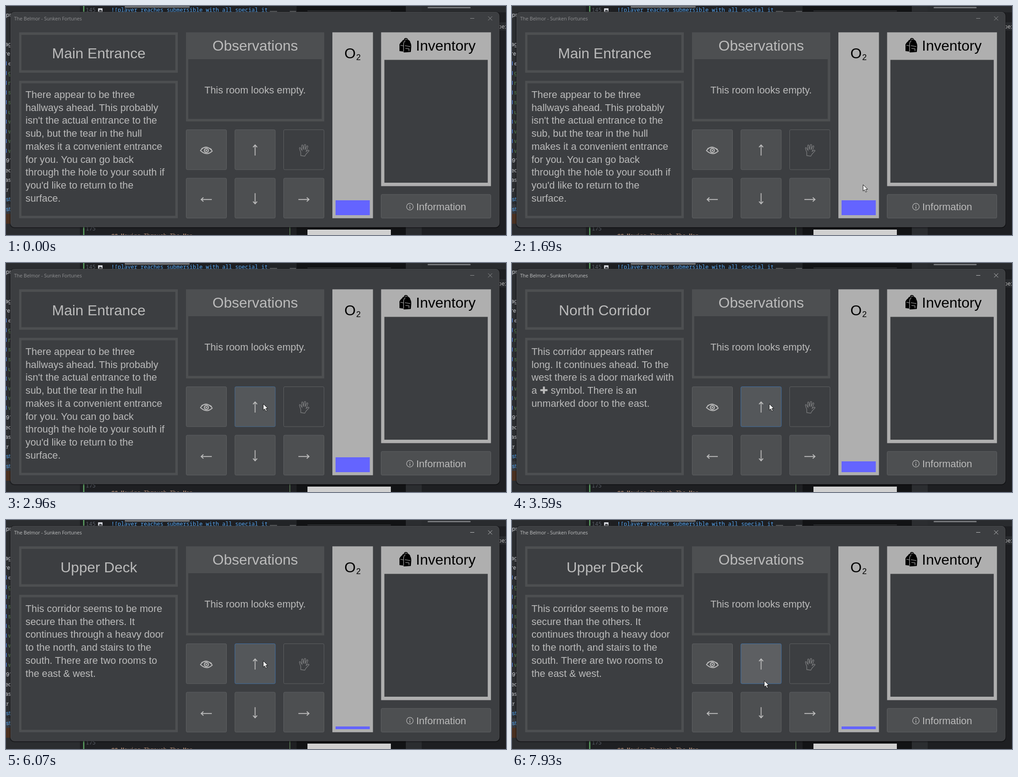
An HTML page that plays this animation: 1103x508 px, repeating every 8000 ms.

```html
<!DOCTYPE html>
<html lang="en">
<head>
<meta charset="utf-8">
<title>The Belmor</title>
<style>
  html, body { margin: 0; width: 100%; height: 100%; overflow: hidden; background: #1e1f22; }
  svg { display: block; width: 1103px; height: 508px; }
  text { font-family: "Liberation Sans", Arial, sans-serif; font-size: 21.8px; fill: #bbb; white-space: pre; }
  .head { font-size: 32px; }
  .mid { text-anchor: middle; }
  .black { fill: #000; }
  .code { font: 12px "Noto Sans Mono", "DejaVu Sans Mono", monospace; }
  .side { font: 12px Inter, "Open Sans", sans-serif; }
  .caption { font: 10.6px "Open Sans", "Noto Sans", sans-serif; }
  .sign { font-family: "DejaVu Sans", sans-serif; }
  .line { fill: none; stroke: #bbb; stroke-width: 1.9; }
  .frame { fill: #4d4f51; }
  .pale { fill: #afafaf; }
  .back { fill: #3c3e41; }
</style>
</head>
<body>
<svg viewBox="0 0 1103 508">
  <!-- editor behind the window -->
  <rect width="1103" height="508" fill="#1e1f22"/>
  <rect width="163" height="508" fill="#2b2d30"/>
  <rect y="440" width="163" height="21" fill="#35383d"/>
  <rect y="461" width="163" height="22" fill="#4a3020"/>
  <rect x="170" width="3" height="508" fill="#549159"/>
  <text class="code" x="176" y="13" style="fill:#5b6069">145</text>
  <rect x="203" y="5" width="10" height="8" rx="1" fill="#ced0d6"/>
  <path d="M204.500 12l3-4 2 2 1-1 2 3z" fill="#2b2d30"/>
  <text class="code" x="232" y="13" style="fill:#56a8f5">![player reaches submersible with all special items](</text>
  <rect x="262" y="0" width="143" height="4" fill="#6b6d70"/>
  <rect x="576" y="0" width="66" height="13" fill="#222427"/>
  <path d="M582 12h16M626 12h14" stroke="#a0a2a6"/>
  <rect x="641" width="241" height="508" fill="#121315"/>
  <rect x="665" y="10" width="184" height="2" fill="#2e3033"/>
  <rect x="882" width="35" height="508" fill="#2b2d30"/>
  <rect x="917" width="186" height="14" fill="#292b2e"/>
  <rect x="930" y="2" width="95" height="3" rx="1.500" fill="#77797c"/>
  <rect x="1088" y="36" width="15" height="18" fill="#292b2e"/>
  <text class="code" x="1086" y="50">per</text>
  <text class="code" x="176" y="498" style="fill:#5b6069">175</text>
  <text class="code" x="232" y="514" style="fill:#b08a72">## Moving Through The Map</text>
  <rect x="625.500" y="480" width="1.500" height="28" fill="#5d8158"/>
  <rect x="665" y="496" width="184" height="12" fill="#d0d0d0"/>
  <g id="tree"></g>

  <!-- window -->
  <rect x="8" y="12" width="1082" height="481" rx="10" fill="#000" opacity=".3"/>
  <rect class="back" x="10.500" y="13.500" width="1077.500" height="476.500" rx="8" stroke="#48494c"/>
  <g id="bar">
    <text class="caption" x="18" y="31.500" style="fill:currentColor">The Belmor - Sunken Fortunes</text>
    <path d="M1024 27.500h9M1063.500 23l9 9m0-9l-9 9" fill="none" stroke="currentColor"/>
  </g>

  <rect class="frame" x="29" y="58.400" width="350" height="89.600"/>
  <rect class="back" x="34" y="64" width="339.500" height="78.500"/>
  <text class="head mid" id="room" x="204.700" y="116"></text>
  <rect class="frame" x="29" y="166" width="350" height="304.800"/>
  <rect class="back" x="34" y="171.500" width="339.500" height="294"/>
  <g id="story"></g>

  <rect class="frame" x="397" y="58.400" width="305" height="197.600"/>
  <rect class="back" x="402" y="118" width="294.500" height="132.500"/>
  <text class="head mid" x="549.800" y="99">Observations</text>
  <text class="mid" id="seen" x="549.500" y="193.500"></text>

  <rect class="pale" x="720" y="58.400" width="89.500" height="412.400"/>
  <text class="head black" x="746.500" y="116">O</text>
  <text class="black" x="772.500" y="119.500" style="font-size:18px">2</text>
  <rect id="air" x="727" width="75.500" fill="#6464ff"/>

  <rect class="pale" x="827.500" y="58.400" width="242.300" height="341.200"/>
  <rect class="back" x="834.700" y="119.500" width="228" height="272.500"/>
  <text class="head black" x="904.300" y="99">Inventory</text>
  <g>
    <path d="M874 78q1-3 4-3 0-4 4-4t5 4q4 1 5 6 2 3 2 9l-1 12-15 1-2-2-8-1V85q2-4 6-7z"/>
    <path d="M877 101V86q0-7 4-9M870 87l7 1.500M880 88l12 2M881 94l8 1v5M880 75q2-3 5 0" fill="none" stroke="#afafaf" stroke-width="1.200"/>
  </g>

  <g id="buttons"></g>
  <path id="cursor" d="M.500.500v14l3.300-3 2.400 5.300 2.400-1-2.400-5.200h4.500z" fill="#fff" stroke="#111"/>
</svg>
<script>
const LOOP = 8000;
const $ = id => document.getElementById(id);

const rooms = [
  { at: 0, name: 'Main Entrance', air: 33, seen: 'This room looks empty.', off: 'hand',
    story: "There appear to be three|hallways ahead. This probably|isn't the actual entrance to the|sub, but the tear in the hull|makes it a convenient entrance|for you. You can go back|through the hole to your south if|you'd like to return to the|surface." },
  { at: 3590, name: 'North Corridor', air: 24, seen: 'This room looks empty.', off: 'hand',
    story: 'This corridor appears rather|long. It continues ahead. To the|west there is a door marked with|a ✚ symbol. There is an|unmarked door to the east.' },
  { at: 4850, name: 'Far N. Corridor', air: 15, seen: 'You can see a extinguisher.', off: 'eye',
    story: 'The corridor continues up some|stairs to the north. West there is|a door with: ⚠ WARNING ⚠|GLOVES &amp; FACE COVERS|MUST BE WORN. To the east is|an unmarked door.' },
  { at: 6070, name: 'Upper Deck', air: 6, seen: 'This room looks empty.', off: 'hand',
    story: 'This corridor seems to be more|secure than the others. It|continues through a heavy door|to the north, and stairs to the|south. There are two rooms to|the east &amp; west.' }
];

const presses = [[3490, 3590], [4580, 4850], [5900, 6070], [7800, LOOP]];
const FOCUS_AT = 3490;

// start, end, step count, waypoints
const moves = [
  [520, 1280, 12, [[948, 470], [905, 425], [830, 407], [711, 445], [722, 425]]],
  [1340, 1690, 6, [[740, 405], [774, 396]]],
  [1750, 2090, 6, [[811, 415], [742, 460], [735, 410], [797, 370]]],
  [2150, 2150, 1, [[788, 366]]],
  [2480, 2960, 8, [[680, 335], [567, 312]]],
  [6730, 7070, 6, [[552, 412]]],
  [7400, 7660, 5, [[556, 356]]]
];

const arrow = (turn, y = 0) =>
  `<path class="line" transform="translate(0 ${y}) rotate(${turn})" d="M0 12V-11M-4.500-6.500L0-11.500 4.500-6.500"/>`;
const icons = {
  eye: '<path class="line" d="M-13 1Q-1-15 13 2 1 14-13 1zM-11-3Q0-10.500 12-1"/><circle cy=".700" r="5.500" fill="#bbb"/><circle cy=".700" r="3.300" fill="#4d4f51"/><circle cy=".700" r="1.800" fill="#bbb"/>',
  up: arrow(0), down: arrow(180), left: arrow(-90, 2), right: arrow(90, 2),
  hand: '<path class="line" transform="rotate(8)" style="stroke-width:1.200" d="M-5 13L-6 6-10-2q-1-2.500 1-2.500 1 0 2 2L-4 1-6-9q0-2 1.500-2 1 0 1.500 2L-1-1-.500-11q0-2 1.500-2t1.500 2V-1L5-9q1-2 2-1.500 1.200.500.600 2.500L5.500 2 9-1q2-1 2.500.500 0 1-1 2L6 8 4 13z"/>',
  info: '<circle class="line" cx="-57.500" r="7.300" style="stroke-width:1.300"/><path class="line" style="stroke-width:1.500" d="M-57.500-4v2m0 1.500v5"/><text x="-43.500" y="7.500" style="font-size:22px">Information</text>'
};

const buttons = [
  ['eye', 397, 274], ['up', 504.5, 274], ['hand', 612, 274],
  ['left', 397, 381.5], ['down', 504.5, 381.5], ['right', 612, 381.5],
  ['info', 827, 417.5, 243, 53.5]
].map(([id, x, y, w = 90, h = 89.5]) => ({ id, x, y, w, h }));

$('buttons').innerHTML = buttons.map(({ id, x, y, w, h }) =>
  `<rect id="${id}" x="${x + .5}" y="${y + .5}" width="${w - 1}" height="${h - 1}" rx="2.500"/>
   <g id="${id}-icon" transform="translate(${x + w / 2} ${y + h / 2 + 1})">${icons[id]}</g>`).join('');

// clipped project tree at the left edge
const tree = ['pr', '', '', 'nag', 'cre', 'e', 'g', 'n', 's', 's', 'u', 'w', 'w', 'w', 'w', '91', 'ned', 'eas', 'str', 'st', 'st'];
$('tree').innerHTML = tree.map((word, i) => {
  const nested = i > 4 && i < 15;
  const fill = i > 18 ? '#56a8f5' : i > 5 && i < 15 ? '#629755' : '#ced0d6';
  const y = 24 + i * 21.55;
  return (nested ? `<rect y="${y - 9}" width="1.2" height="9" fill="#548af7"/>` : '') +
    `<text class="side" x="${nested ? 5 : word.length > 2 ? -9 : 0}" y="${y}" style="fill:${fill}">${word}</text>`;
}).join('');

function cursorAt(t) {
  let from = [950, 510], pos = null;
  for (const [start, end, count, points] of moves) {
    if (t < start) break;
    const part = end > start ? Math.min(1, (t - start) / (end - start)) : 1;
    const step = Math.floor(part * (count - 1) + 1e-6) + 1;
    const path = [from, ...points];
    const along = step / count * points.length;
    const i = Math.min(points.length - 1, Math.floor(along));
    pos = path[i].map((v, k) => Math.round(v + (path[i + 1][k] - v) * (along - i)));
    from = points[points.length - 1];
  }
  return pos;
}

let shown;
function showRoom(room) {
  if (room === shown) return;
  shown = room;
  $('room').textContent = room.name;
  $('seen').textContent = room.seen;
  $('air').setAttribute('y', 464 - room.air);
  $('air').setAttribute('height', room.air);
  $('story').innerHTML = room.story.split('|').map((line, i) =>
    `<text x="43" y="${204 + i * 28.7}">${line.replace(/[✚⚠]/g, '<tspan class="sign">$&</tspan>')}</text>`).join('');
}

function paintButton(b, pos, t) {
  const off = shown.off === b.id;
  const over = pos && pos[0] >= b.x && pos[0] < b.x + b.w && pos[1] >= b.y && pos[1] < b.y + b.h;
  const down = over && b.id === 'up' && presses.some(([from, to]) => t >= from && t < to);
  const focus = b.id === 'up' && t >= FOCUS_AT;
  const fill = off ? '#3c3e41' : down ? '#5d5f62' : over ? '#54575a' : '#4d4f51';
  $(b.id).setAttribute('fill', fill);
  $(b.id).setAttribute('stroke', focus ? '#4172a8' : over ? '#466d94' : '#5e6062');
  $(b.id + '-icon').setAttribute('opacity', off ? .55 : 1);
}

function draw(now) {
  const t = now % LOOP;
  const pos = cursorAt(t);
  showRoom(rooms.filter(r => r.at <= t).pop());
  buttons.forEach(b => paintButton(b, pos, t));
  $('bar').style.color = t < FOCUS_AT ? '#909193' : '#c0c1c2';
  $('cursor').style.display = pos ? '' : 'none';
  if (pos) $('cursor').setAttribute('transform', `translate(${pos})`);
}

const begin = performance.now();
function tick() {
  draw(performance.now() - begin);
  requestAnimationFrame(tick);
}
tick();
</script>
</body>
</html>
```
